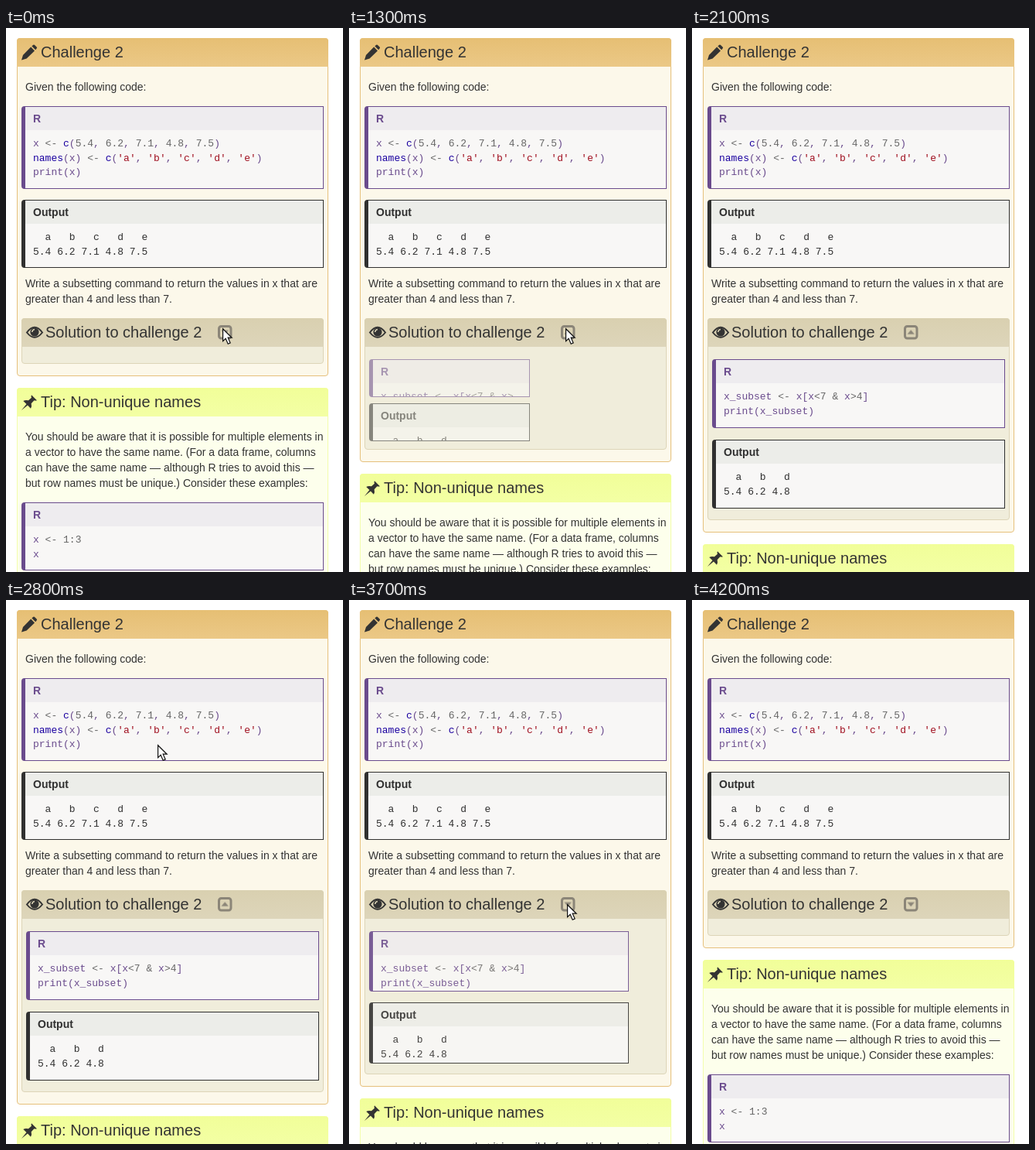
Animation, 436 px wide and 703 px high, one loop 4500 ms. Source, as an HTML page:

```html
<!DOCTYPE html>
<html lang="en">
<head>
<meta charset="utf-8">
<title>Solution toggle</title>
<style>
/* --q is how far the solution is open, 0 to 1 */
@property --q { syntax: "<number>"; inherits: true; initial-value: 0; }

html, body { margin: 0; width: 100%; height: 100%; overflow: hidden; background: #fff; }
* { box-sizing: border-box; }

.stage {
  position: relative; width: 436px; height: 703px; overflow: hidden;
  color: #333; font: 14px/20px "Liberation Sans", Arial, sans-serif; white-space: nowrap;
  --shift: calc(var(--q) * 202px);
  animation: open 4.5s step-end infinite;
}
.stage div, .stage svg, h2, p { position: absolute; margin: 0; }
.stage svg { overflow: visible; fill: #333; }

.panel { border: 1px solid var(--line); border-radius: 4px; background: var(--fill); }
h2 {
  left: -1px; right: -1px; top: -1px; height: 37px; padding-left: 31px;
  border-radius: 4px 4px 0 0;
  font-size: 20px; font-weight: 400; line-height: 37px;
  background: linear-gradient(var(--from), var(--to));
}
p { left: 10px; }

.challenge {
  left: 14px; top: 13px; width: 403px; height: calc(437px + var(--shift));
  --line: #e6c07c; --fill: #fcf8ea; --from: #e6bf74; --to: #ebc886;
}
.solution {
  left: 5px; top: 361px; width: 391px; height: calc(59px + var(--shift));
  --line: #ddd5b8; --fill: #f0eddb; --from: #d9d0b0; --to: #ddd5ba;
}
.tip {
  left: 14px; top: calc(465px + var(--shift)); width: 403px; height: 300px;
  --line: #f3fdac; --fill: #fdffec; --from: #f1fe99; --to: #f3ffa4;
}

.block {
  left: 5px; width: 391px; height: 88px; overflow: hidden;
  border: 1px solid var(--ink); border-left-width: 5px; border-radius: 4px 0 0 4px;
  background: #f8f7f6; color: var(--ink);
}
.source { --ink: #6a4b8d; --bar: #eeecef; }
.output { --ink: #303030; --bar: #ecede9; }
.block b { display: block; height: 30px; padding-left: 10px; line-height: 30px; background: var(--bar); }
pre {
  margin: 0; padding: 9px 15px 9.5px 10px;
  font: 13px/18.57px "Liberation Mono", "Courier New", monospace;
  white-space: pre-wrap; word-break: break-all;
}
i { font-style: normal; color: #666; }
em { font-style: normal; color: #1a00a0; }
s { text-decoration: none; color: #a01020; }

.solution .block {
  width: calc(var(--q) * 379px); height: calc(var(--q) * 88.5px); opacity: var(--q);
}
.solution .source { top: 52px; }
.solution .output { top: calc(52px + var(--q) * 104px); }

.arrow { animation: flip 4.5s step-end infinite; }
.stage .cursor { left: 0; top: 0; animation: move 4.5s step-end infinite; }

@keyframes open {
  0% { --q: 0; }
  24.44% { --q: .045; }
  26.66% { --q: .25; }
  28.88% { --q: .549; }
  31.11% { --q: .829; }
  33.33% { --q: .987; }
  35.55% { --q: 1; }
  82.22% { --q: .886; }
  84.44% { --q: .549; }
  86.66% { --q: .183; }
  88.88%, 100% { --q: 0; }
}
@keyframes flip {
  0%, 80%, 100% { transform: none; }
  24.44% { transform: scaleY(-1); }
}
@keyframes move {
  0% { transform: translate(280px, 388px); }
  33.33% { transform: translate(236px, 335px); }
  35.55% { transform: translate(164px, 244px); }
  37.77% { transform: translate(130px, 222px); }
  40% { transform: translate(119px, 214px); }
  44.44% { transform: translate(134px, 105px); }
  46.66% { transform: translate(-50px, -50px); }
  62.22% { transform: translate(196px, 187px); }
  64.44% { transform: translate(272px, 262px); }
  66.66% { transform: translate(339px, 340px); }
  68.88% { transform: translate(318px, 375px); }
  71.11% { transform: translate(292px, 390px); }
  73.33% { transform: translate(282px, 393px); }
  84.44% { transform: translate(235px, 275px); }
  86.66% { transform: translate(165px, 110px); }
  88.88% { transform: translate(125px, 15px); }
  93.33%, 100% { transform: translate(-50px, -50px); }
}
</style>
</head>
<body>
<div class="stage">
  <div class="panel challenge">
    <h2>Challenge 2</h2>
    <svg style="left:5px; top:7px" width="21" height="21">
      <path d="M0 20.5 2 14 12.2 3.6 17 8.4 6.6 18.6ZM13.4 2.4 15 .9Q16 0 17 .9L19.6 3.5Q20.6 4.6 19.6 5.6L18.2 7.2Z"/>
    </svg>
    <p style="top:52px">Given the following code:</p>

    <div class="block source" style="top:87px; height:106.5px"><b>R</b><pre>x <i>&lt;-</i> <em>c</em>(<i>5.4</i>, <i>6.2</i>, <i>7.1</i>, <i>4.8</i>, <i>7.5</i>)
<em>names</em>(x) <i>&lt;-</i> <em>c</em>(<s>'a'</s>, <s>'b'</s>, <s>'c'</s>, <s>'d'</s>, <s>'e'</s>)
print(x)</pre></div>

    <div class="block output" style="top:208px"><b>Output</b><pre>  a   b   c   d   e
5.4 6.2 7.1 4.8 7.5</pre></div>

    <p style="top:306px">Write a subsetting command to return the values in x that are<br>greater than 4 and less than 7.</p>

    <div class="panel solution">
      <h2>Solution to challenge 2</h2>
      <svg style="left:5px; top:9px" width="22" height="17">
        <path d="M1 8.5Q11 -5 21 8.5Q11 21 1 8.5Z" fill="none" stroke="#333" stroke-width="2"/>
        <circle cx="11" cy="8" r="5.6"/>
        <path d="M7.8 8Q8 5 11 4.6" fill="none" stroke="#dbd3b6" stroke-width="1.5"/>
      </svg>
      <svg style="left:253px; top:8px" width="18" height="18">
        <rect x="1.5" y="1.5" width="15.5" height="15.5" rx="3" fill="none" stroke="#8b8578" stroke-width="3"/>
        <g transform="translate(9.2 9.2)"><path class="arrow" d="M-4.6 -2.6H4.6L0 3Z" fill="#8b8578"/></g>
      </svg>
      <div class="block source"><b>R</b><pre>x_subset <i>&lt;-</i> x[x<i>&lt;7</i> <i>&amp;</i> x<i>&gt;4</i>]
print(x_subset)</pre></div>
      <div class="block output"><b>Output</b><pre>  a   b   d
5.4 6.2 4.8</pre></div>
    </div>
  </div>

  <div class="panel tip">
    <h2>Tip: Non-unique names</h2>
    <svg style="left:5px; top:8px" width="21" height="21">
      <path d="M0 20 6.5 12 2.3 8Q5 6.3 9 7.3L13 3.8Q12 2 13 .3L20 7.2Q18.2 8 16.4 7.2L12.7 11.2Q13.7 15 12 17.7L8 13.5Z"/>
    </svg>
    <p style="top:52px">You should be aware that it is possible for multiple elements in<br>a vector to have the same name. (For a data frame, columns<br>can have the same name — although R tries to avoid this —<br>but row names must be unique.) Consider these examples:</p>
    <div class="block source" style="top:147px"><b>R</b><pre>x <i>&lt;-</i> <i>1:3</i>
x</pre></div>
  </div>

  <svg class="cursor" width="13" height="21">
    <path d="M.6 .8V16.6L4.2 13.2 7.2 20.2 10.2 18.9 7.2 12.2H12.2Z" fill="#fff" stroke="#111" stroke-width="1.2"/>
  </svg>
</div>
</body>
</html>
```
